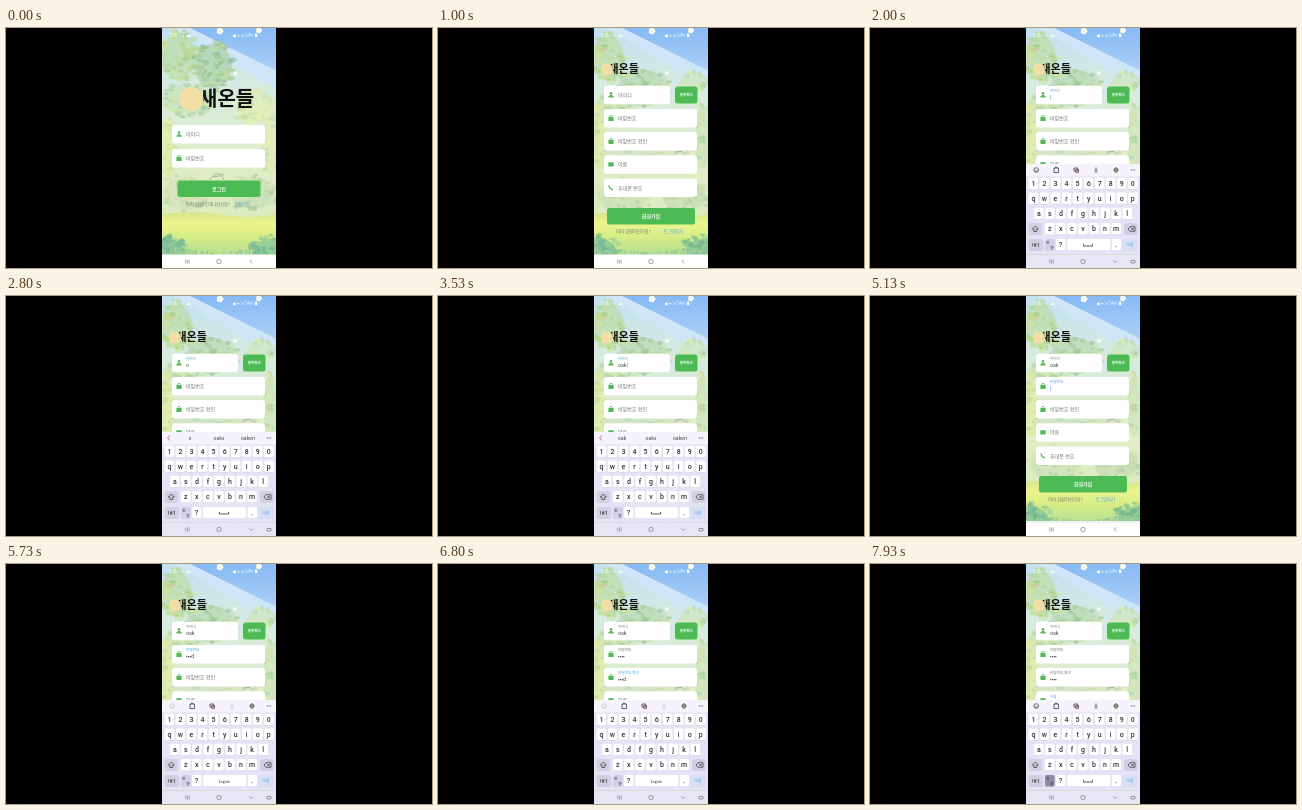
Animation of 426 by 240 pixels, one loop 8000 ms. Source, as an HTML page:

```html
<!DOCTYPE html>
<html lang="ko">
<head>
<meta charset="utf-8">
<title>회원가입</title>
<style>
html, body { margin: 0; width: 100%; height: 100%; overflow: hidden; background: #000; }
svg { display: block; width: 100vw; height: 100vh; }
text { font-family: 'Noto Sans CJK KR', 'Noto Sans CJK', 'Noto Sans', sans-serif; white-space: pre; }
.latin { font-family: Roboto, sans-serif; }
</style>
</head>
<body>
<svg id="stage" viewBox="0 0 426 240">
  <defs>
    <clipPath id="phone"><path d="M156 0H270V240H156Z"/></clipPath>
    <clipPath id="aboveNav"><path d="M156 0H270V226.5H156Z"/></clipPath>
    <linearGradient id="air" x1="0" y1="0" x2="0" y2="1">
      <stop offset="0" stop-color="#c3e0f3"/>
      <stop offset=".25" stop-color="#d6ebdf"/>
      <stop offset=".55" stop-color="#e0eec8"/>
      <stop offset="1" stop-color="#d9eab4"/>
    </linearGradient>
    <linearGradient id="sky" x1="0" y1="0" x2="0" y2="1">
      <stop offset="0" stop-color="#86b9f5"/>
      <stop offset="1" stop-color="#acd2f6"/>
    </linearGradient>
    <linearGradient id="meadow" x1="0" y1="0" x2="0" y2="1">
      <stop offset="0" stop-color="#d3e58a"/>
      <stop offset=".25" stop-color="#ecf58d"/>
      <stop offset=".55" stop-color="#d5ec86"/>
      <stop offset="1" stop-color="#b0dc96"/>
    </linearGradient>
    <filter id="soft" x="-20%" y="-20%" width="140%" height="140%"><feGaussianBlur stdDeviation=".7"/></filter>
  </defs>
</svg>
<script>
const LOOP = 8000;
const GREEN = '#4dbb54', BLUE = '#4a9bd8', GRAY = '#707670', INK = '#333';
const stage = document.getElementById('stage');

function el(parent, tag, attrs = {}) {
  const node = document.createElementNS('http://www.w3.org/2000/svg', tag);
  for (const key in attrs) node.setAttribute(key, attrs[key]);
  return parent.appendChild(node);
}
const group = (parent, attrs) => el(parent, 'g', attrs);
const box = (p, x, y, width, height, fill, rx = 0) => el(p, 'rect', { x, y, width, height, fill, rx });
const oval = (p, cx, cy, rx, ry, fill, opacity = 1) => el(p, 'ellipse', { cx, cy, rx, ry, fill, opacity });
const shape = (p, d, fill) => el(p, 'path', { d, fill });
const line = (p, d, stroke, w = .7) => el(p, 'path', { d, stroke, 'stroke-width': w, fill: 'none' });
function label(p, x, y, size, str, fill = INK, anchor = 'start', weight = 400) {
  const node = el(p, 'text', { x, y, fill, 'font-size': size, 'text-anchor': anchor, 'font-weight': weight });
  node.textContent = str;
  return node;
}
const show = (node, on) => node.setAttribute('display', on ? 'inline' : 'none');
const ramp = (t, from, to) => Math.min(1, Math.max(0, (t - from) / (to - from)));
const ease = p => 1 - (1 - p) ** 3;

function random(seed) {
  return () => (seed = (seed * 16807) % 2147483647) / 2147483647;
}

// Watercolour woods: sky, clumps of small leaves, a meadow and bushes
function woods(parent, clumps, seed) {
  const rnd = random(seed);
  const leaves = (p, x, y, rx, ry, colors, count) => {
    for (let i = 0; i < count; i++) {
      const a = rnd() * 2 * Math.PI, r = Math.sqrt(rnd());
      oval(p, x + Math.cos(a) * rx * r, y + Math.sin(a) * ry * r,
        1.5 + rnd() * 2.5, 1 + rnd() * 1.8, colors[Math.floor(rnd() * colors.length)], .6);
    }
  };
  box(parent, 156, 0, 114, 240, 'url(#air)');
  const paint = group(parent, { filter: 'url(#soft)' });
  shape(paint, 'M184 0H272V44Z', 'url(#sky)');
  shape(paint, 'M184 0L272 44V62L168 0Z', '#cfe6f8');
  for (const [x, y, rx, ry, ...colors] of clumps) {
    oval(paint, x, y, rx * .85, ry * .85, colors[0], .55);
    leaves(paint, x, y, rx, ry, colors, rx * ry / 8);
  }
  shape(paint, 'M154 186Q190 182 220 187T272 185V230H154Z', 'url(#meadow)');
  for (const x of [156, 270]) {
    oval(paint, x, 222, 22, 12, '#8cc99a', .8);
    leaves(paint, x, 219, 26, 13, ['#79bd97', '#98d29b', '#6fb292'], 70);
  }
  for (let i = 0; i < 45; i++) {
    const x = 156 + rnd() * 114, h = 3 + Math.abs(x - 213) / 8;
    line(paint, `M${x} 228q${rnd() * 4 - 2} ${-h / 2} ${rnd() * 6 - 3} ${-h}`, '#8fca93', 1);
  }
  for (const [x, y, r] of [[214, 3, 3.2], [253, 2.5, 2.8], [229, 45, 1.8], [183, 8, 1.5]])
    for (let k = 0; k < 5; k++)
      oval(parent, x + Math.cos(k * 1.257) * r * .6, y + Math.sin(k * 1.257) * r * .6, r * .5, r * .5, '#fdfdea');
}

function brand(p, x, y, size, cx, cy, r) {
  label(p, x, y, size, '새온들', '#111', 'start', 700);
  el(p, 'circle', { cx, cy, r, fill: '#f3dfa5' });
}

function icon(p, kind, y) {
  if (kind === 'user') {
    oval(p, 173, y - 1.4, 1.3, 1.4, GREEN);
    shape(p, `M170.3 ${y + 2.7}q0-2.5 2.7-2.5t2.7 2.5z`, GREEN);
  } else if (kind === 'lock') {
    box(p, 170.4, y - 1, 5.2, 4, GREEN, .7);
    line(p, `M171.5 ${y}v-1.5q1.5-2.8 3 0v1.5`, GREEN, .9);
  } else if (kind === 'card') {
    box(p, 170.3, y - 2, 5.4, 4.4, GREEN, .6);
  } else {
    line(p, `M171 ${y - 2}q.5 3.5 4 4.2`, GREEN, 1.4);
  }
}

// A form field whose caption floats up once it has focus or content
function field(p, y, kind, caption, width = 93) {
  box(p, 166, y, width, 18.5, '#fff', 3);
  icon(p, kind, y + 9);
  const idle = label(p, 180, y + 11, 5, caption, GRAY);
  const small = label(p, 180, y + 6.3, 3.6, caption, BLUE);
  const value = label(p, 180, y + 13.3, 5, '', INK, 'start', 500);
  const caret = box(p, 180, y + 9, .5, 5, BLUE);
  const update = (focused, str, t) => {
    const up = focused || str !== '';
    show(idle, !up);
    show(small, up);
    small.setAttribute('fill', focused ? BLUE : GRAY);
    value.textContent = str;
    show(caret, focused && t % 1000 < 560);
    caret.setAttribute('x', 180.4 + (str ? value.getComputedTextLength() : 0));
  };
  update(false, '', 0);
  return update;
}

function button(p, x, y, w, h, str, size) {
  box(p, x, y, w, h, GREEN, 2.5);
  label(p, x + w / 2, y + h / 2 + size * .36, size, str, '#fff', 'middle', 700);
}

const phone = group(stage, { 'clip-path': 'url(#phone)' });

const login = group(phone);
woods(login, [
  [172, 28, 20, 28, '#b9d994', '#cfe59a', '#a3cc8c'],
  [207, 38, 22, 26, '#a6cc98', '#bfdc94', '#8fbd92'],
  [180, 72, 26, 18, '#c3deac', '#d8eaa8', '#a9cda2'],
  [250, 78, 22, 20, '#dcebae', '#c5e0a8', '#e8f2b8'],
  [161, 120, 8, 34, '#dfeca0', '#c8e0a0', '#eef4b4'],
  [264, 118, 9, 34, '#dcebb0', '#bfdcae', '#e8f2b4'],
  [180, 165, 26, 19, '#cfe0b4', '#b8d2ac', '#e2e6bc'],
  [246, 165, 26, 19, '#c2dab2', '#a9c9a8', '#d8e6b4']
], 17);
brand(login, 193, 78, 20, 185.5, 71, 12);
field(login, 97, 'user', '아이디');
field(login, 121, 'lock', '비밀번호');
line(login, 'M204 152q2-5 6-3q6-4 8 3M207 148q4-4 11-1', '#8b988b', .7);
button(login, 171.5, 152.5, 83, 16.5, '로그인', 5);
label(login, 180, 177.5, 4.3, '아직 회원이 아니신가요?', '#6d776c');
label(login, 244, 177.5, 4.3, '회원가입', BLUE, 'end');

const signup = group(phone);
woods(signup, [
  [170, 30, 19, 26, '#bcdb95', '#d0e69c', '#a6ce8c'],
  [204, 60, 28, 22, '#b3d3a4', '#c6df9c', '#9cc498'],
  [176, 75, 20, 14, '#cbe2ac', '#dceba8', '#b3d3a2'],
  [256, 54, 16, 12, '#cbe3b4', '#b5d6a4', '#dcecb8'],
  [161, 110, 8, 36, '#dcea9c', '#c4de9c', '#eaf2b0'],
  [264, 110, 8, 36, '#c8e2b0', '#b2d4a6', '#dcecb4'],
  [205, 125, 45, 10, '#cde1c0', '#b9d3b0', '#dceabc'],
  [185, 168, 30, 18, '#c8deb4', '#b0cfa8', '#dce6b8'],
  [246, 168, 26, 18, '#c0d8b0', '#a9c9a8', '#d4e4b4']
], 29);
line(signup, 'M169 22h-6m2-2l-2 2l2 2', '#eeb49a', .7);
brand(signup, 170.5, 45, 11, 169, 41.5, 6);
line(signup, 'M237 126q2-4 4-2q4-2 4 2', '#8b988b', .7);
const idField = field(signup, 57.8, 'user', '아이디', 66);
button(signup, 237, 58.5, 22.5, 17, '중복확인', 3.5);
const passField = field(signup, 81, 'lock', '비밀번호');
const againField = field(signup, 104, 'lock', '비밀번호 확인');
const nameField = field(signup, 127.2, 'card', '이름');
field(signup, 150.5, 'phone', '휴대폰 번호');
button(signup, 169, 180, 88, 16.5, '회원가입', 5);
label(signup, 178, 204.5, 4.3, '이미 회원이신가요?', '#6d776c');
label(signup, 245, 204.5, 4.3, '로그인하기', BLUE, 'end');

const dim = box(phone, 156, 0, 114, 240, '#000');
const dialog = group(phone);
box(dialog, 174, 101, 78, 36, '#fff', 2);
label(dialog, 180.5, 111.5, 4.9, '사용 가능한 아이디입니다!', INK, 'start', 500);
box(dialog, 207.5, 125, 10, 7, '#d8f0fc', 1.5);
label(dialog, 212.5, 130.3, 4.5, '확인', BLUE, 'middle', 500);

const status = group(phone);
label(status, 163, 9, 4.2, '3:01', '#fff');
label(status, 177, 9, 4, '▸ ▴ –', '#fff');
label(status, 226, 9, 4.2, '◀ ▾ ııl 54%', '#fff');
box(status, 249, 5.5, 2.3, 3.8, '#fff', .5);

// Keyboard
const keyboardClip = group(phone, { 'clip-path': 'url(#aboveNav)' });
const keyboard = group(keyboardClip);
box(keyboard, 156, 136, 114, 104, '#e7e3f6');
box(keyboard, 156, 136, 114, 12.5, '#f5f3fb');
function key(x, y, w, str, fill = '#fff', size = 7, color = INK) {
  box(keyboard, x, y + .5, w, 11.5, '#d3cee4', 1.7);
  const cap = box(keyboard, x, y, w, 11.5, fill, 1.7);
  label(keyboard, x + w / 2, y + 5.8 + size * .35, size, str, color, 'middle', 500)
    .setAttribute('class', 'latin');
  return cap;
}
[['1234567890', 158.6, 149.8], ['qwertyuiop', 158.6, 164.5],
 ['asdfghjkl', 164, 179.7], ['zxcvbnm', 175, 195]].forEach(([row, x, y]) =>
  [...row].forEach((ch, i) => key(x + i * 11.05, y, 9.6, ch)));
const SIDE = '#d4cfe5';
key(158.6, 195, 13.5, '', SIDE);
line(keyboard, 'M165.3 198l-3 3h1.6v2.5h2.8v-2.5h1.6z', INK, .7);
key(254, 195, 13.5, '', SIDE);
line(keyboard, 'M258 201l2-2.3h5v4.6h-5zM261.5 200l2 2m0-2l-2 2', INK, .7);
key(158.6, 211, 14.5, '!#1', SIDE, 5.2);
const languageKey = key(175, 211, 9.6, '', SIDE);
label(keyboard, 177.9, 216.3, 3.6, '한', INK, 'middle', 500);
label(keyboard, 181.8, 220.6, 3.6, '영', INK, 'middle', 500);
key(186, 211, 9.6, '?');
key(197, 211, 43, '');
const spaceMark = line(keyboard, 'M213.5 216v2h9v-2', INK, .8);
const spaceName = label(keyboard, 218.5, 218.5, 3.4, 'English', INK, 'middle', 500);
key(241.5, 211, 9.6, '.');
key(252.5, 211, 15, '다음', '#d8e0f5', 4, BLUE);

const tools = group(keyboard);
const faded = [];
const toolArt = [
  'M164 142a2.3 2.3 0 1 0 4.6 0a2.3 2.3 0 1 0-4.6 0M165.2 142.5q1.1 1.5 2.2 0',
  'M184 140h4.5v4.5h-4.5zM185 139.3h2.5',
  'M204 140h3.5v3h-3.5zM205.5 141.3h3v3h-3z',
  'M226 139.5v3m-1.7-.5q1.7 3 3.4 0m-1.7 1.5v1.5',
  'M244 142a2 2 0 1 0 4 0a2 2 0 1 0-4 0M246 139.5v5M243.5 142h5',
  'M261 142h1m.6 0h1m.6 0h1'
];
toolArt.forEach((d, i) => {
  const art = line(tools, d, i === 1 ? '#5b596b' : '#756358', 1);
  if (i === 0 || i === 3) faded.push(art);
});
const hints = group(keyboard);
line(hints, 'M164 139.5l-2.5 2.5l2.5 2.5', '#c0505a', .9);
const hintWords = [184, 213, 242].map(x => label(hints, x, 143.7, 5, '', INK, 'middle', 500));
line(hints, toolArt[5], '#555', 1);

const nav = box(phone, 156, 226.5, 114, 13.5, '#fff');
line(phone, 'M179.7 231.5v4m1.7-4v4m1.7-4v4', '#777', .6);
el(phone, 'rect', { x: 211, y: 231.5, width: 4, height: 4, rx: 1.3, fill: 'none', stroke: '#777', 'stroke-width': .7 });
const back = line(phone, 'M246 231.5l-2 2l2 2', '#777', .7);
const fold = line(phone, 'M243 232.5l2 2l2-2M261 232.5h4v2.5h-4z', '#777', .7);

// Timeline
const USER = 'oak', HINTS = [USER, 'oaks', 'oaken'], SECRET = 'abcd';
const typed = (t, times) => times.filter(at => t >= at).length;
const USER_KEYS = [2700, 2970, 3240];
const PASS_KEYS = [5320, 5450, 5580, 5690];
const AGAIN_KEYS = [6350, 6490, 6620, 6750];

function masked(t, times) {
  const n = typed(t, times);
  if (!n) return '';
  return t - times[n - 1] < 220 ? '•'.repeat(n - 1) + SECRET[n - 1] : '•'.repeat(n);
}

function draw(t) {
  show(login, t < 930);
  show(signup, t >= 930);

  const user = USER.slice(0, typed(t, USER_KEYS));
  const onId = t >= 1750 && t < 3870;
  const onPass = t >= 5130 && t < 6150;
  const onAgain = t >= 6150 && t < 7270;
  idField(onId, user, t);
  passField(onPass, masked(t, PASS_KEYS), t);
  againField(onAgain, masked(t, AGAIN_KEYS), t);
  nameField(t >= 7270, '', t);

  const up = t < 4600
    ? ease(ramp(t, 1720, 1900)) * (1 - ease(ramp(t, 3870, 4020)))
    : ease(ramp(t, 5130, 5280));
  show(keyboardClip, up > 0);
  keyboard.setAttribute('transform', `translate(0 ${91 * (1 - up)})`);
  const secret = onPass || onAgain;
  faded.forEach(art => art.setAttribute('opacity', secret ? .25 : 1));
  show(spaceMark, !secret);
  show(spaceName, secret);
  const hinting = onId && user !== '';
  show(hints, hinting);
  show(tools, !hinting);
  hintWords.forEach((word, i) => {
    word.textContent = i ? HINTS[i] : user;
  });
  languageKey.setAttribute('fill', t >= 7870 ? '#8f8a9f' : SIDE);
  nav.setAttribute('fill', up > .5 ? '#e9e5f5' : '#fff');
  show(back, up <= .5);
  show(fold, up > .5);

  const alert = ramp(t, 4200, 4350) * (1 - ramp(t, 4950, 5080));
  dim.setAttribute('opacity', alert * .55);
  dialog.setAttribute('opacity', alert);
}

const start = performance.now();
function tick() {
  draw((performance.now() - start) % LOOP);
  requestAnimationFrame(tick);
}
draw(0);
requestAnimationFrame(tick);
</script>
</body>
</html>
```
